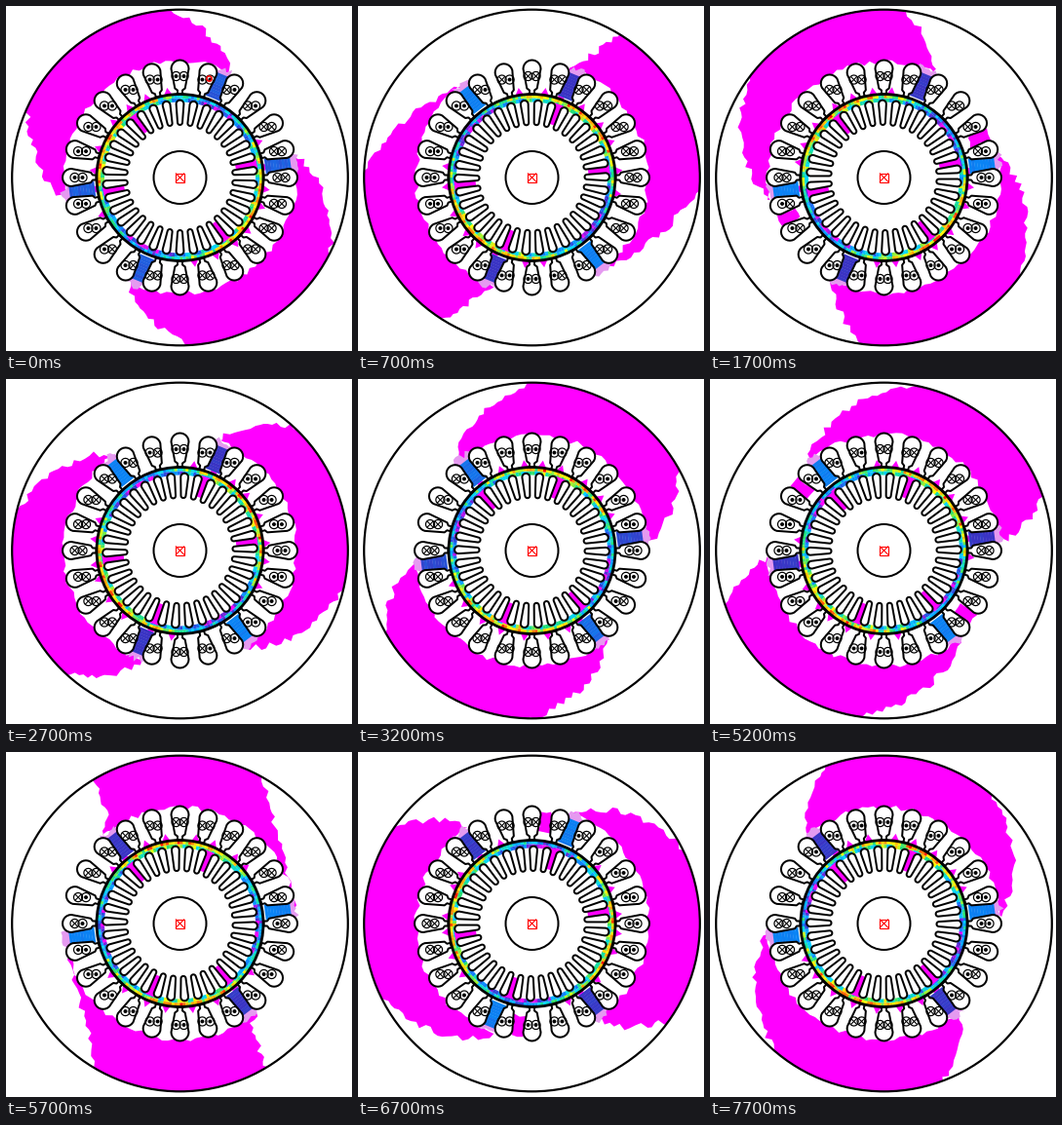
These frames come from a looping animation (355 by 354 pixels, 8000 ms). A matplotlib script:

```python
import random

import numpy as np
import matplotlib.pyplot as plt
from matplotlib.animation import FuncAnimation
from matplotlib.collections import LineCollection, PolyCollection
from matplotlib.colors import LinearSegmentedColormap, to_rgb
from matplotlib.patches import Circle, Rectangle

W, H, DPI = 355, 354, 100
PX = 72 / DPI
CX, CY = 178.5, 176
R_OUT, R_BORE, R_SHAFT, R_YOKE = 172.3, 85.5, 27, 119
SLOTS, BARS = 24, 34
PITCH = 360 / BARS
STATES = 17
STEP = 40          # rotor and current advance per state, degrees
DRIFT = 42.3       # advance of the saturated yoke, slightly faster
RIM_HALF = 30      # half the angle the saturation covers at the rim

MAGENTA, LAVENDER = to_rgb("#ff00ff"), to_rgb("#e59af0")
BRIGHT, INDIGO = np.array(to_rgb("#0a84f5")), np.array(to_rgb("#3a34c4"))
HEAT = LinearSegmentedColormap.from_list(
    "heat", ["#ff00ff", "#3a34d0", "#0a84ff", "#00d8ff",
             "#20e070", "#ffff00", "#ff9000", "#ff0000"])


def polar(deg, r):
    a = np.radians(deg)
    return CX + r * np.cos(a), CY - r * np.sin(a)


def place(pts, deg):
    """Map (radial, tangential) points onto the ray at deg."""
    a = np.radians(deg)
    return [(CX + u * np.cos(a) + v * np.sin(a),
             CY - u * np.sin(a) + v * np.cos(a)) for u, v in pts]


def cap(u, r, start, end):
    return [(u + r * np.cos(a), r * np.sin(a))
            for a in np.radians(np.linspace(start, end, 13))]


def strip(deg, r0, r1, half):
    return place([(r0, -half), (r1, -half), (r1, half), (r0, half)], deg)


SLOT = ([(86, -2.5), (89.5, -2.5), (91.5, -5.2)] + cap(111.5, 9, -90, 90)
        + [(91.5, 5.2), (89.5, 2.5), (86, 2.5)])
BAR = cap(75.5, 3.9, -90, 90) + cap(56.5, 2.5, 90, 270)


def jagged(pts, rng, size, gap):
    """Break a polyline into irregular saw teeth."""
    out = []
    for (x0, y0), (x1, y1) in zip(pts, pts[1:]):
        length = np.hypot(x1 - x0, y1 - y0) + 1e-6
        n = max(1, round(length / gap))
        nx, ny = (y0 - y1) / length, (x1 - x0) / length
        for i in range(n):
            t = i / n
            d = size * rng.uniform(-1.2, 1.2)
            out.append((x0 + t * (x1 - x0) + d * nx, y0 + t * (y1 - y0) + d * ny))
    return out + [pts[-1]]


def saturation(k):
    """Rim centre, inner lead and trail angles, and progress of the lead.

    At the slots the edges cling to the teeth between phase belts and jump
    by 60 degrees; at the rim they move on evenly.
    """
    centre = 123.5 + DRIFT * k
    reach = centre + 37
    trail = 60 * np.ceil((reach - 11) / 60) + 11
    return centre, trail - 127, trail, trail - reach


def yoke(k, half, rng):
    centre, lead, trail, wait = saturation(k)
    bend = np.clip(wait / 9, 0.3, 1.2)
    t = np.linspace(0, 1, 8)

    def edge(inner, rim):
        return [polar(half + inner + (rim - inner) * s ** bend,
                      R_YOKE + (R_OUT + 1 - R_YOKE) * s) for s in t]

    lo, hi = centre - RIM_HALF, centre + RIM_HALF
    rim = [polar(half + a, R_OUT + 2) for a in np.linspace(lo, hi, 30)]
    inner = [polar(half + a, R_YOKE) for a in np.linspace(trail, lead, 24)]
    return (jagged(edge(lead, lo), rng, 3, 5) + rim
            + jagged(edge(trail, hi)[::-1], rng, 3, 5)
            + jagged(inner, rng, 2.4, 5))


def tooth(deg, mix, rng):
    """Lavender tip plus a stack of blue slices; mix runs bright to indigo."""
    tip = place([(104, -9), (119, -10), (121, 0), (119, 10), (104, 9)], deg)
    polys, cols = [jagged(tip, rng, 3, 4)], [LAVENDER]
    for i in range(9):
        m = np.clip(mix + rng.uniform(-0.12, 0.12), 0, 1)
        r = 88 + 2.9 * i
        polys.append(strip(deg, r, r + 3.2, 8))
        cols.append(tuple(BRIGHT * (1 - m) + INDIGO * m))
    return polys, cols


def air_gap(hot, rng):
    polys, cols = [], []
    for deg in range(0, 360, 2):
        flux = abs(np.cos(np.radians(deg - hot)))
        ripple = 0.1 * np.cos(np.radians((deg - hot) * BARS))
        for r0, r1, drop in ((77.5, 81.5, 0.2), (81.5, 85.5, 0)):
            v = 0.24 + 0.56 * flux - drop + ripple + rng.uniform(-0.13, 0.13)
            polys.append([polar(deg, r0), polar(deg + 2.2, r0),
                          polar(deg + 2.2, r1), polar(deg, r1)])
            cols.append(HEAT(np.clip(v, 0, 1))[:3])
    return polys, cols


def stator_field(k, rng):
    _, lead, trail, wait = saturation(k)
    hot = 150 + STEP * k
    indigo = np.clip((wait - 20) / 20, 0, 1)
    polys = [yoke(k, half, rng) for half in (0, 180)]
    for half in (0, 180):
        if wait > 36:  # the next tooth starts to saturate
            block = strip(trail + 11.5 + half, 95, 116, 6)
            polys.append(jagged(block + block[:1], rng, 1.5, 5))
    for i in range(SLOTS):
        deg = 7.5 + 15 * i
        if abs(np.cos(np.radians(deg - hot))) > 0.5:
            s = rng.uniform(-5, 5)
            polys.append(place([(86, s - 4), (93, s), (86, s + 4)], deg))
    cols = [MAGENTA] * len(polys)
    for half in (0, 180):
        for deg, mix in ((lead + 3.5, indigo), (trail - 3.5, 1 - indigo)):
            ps, cs = tooth(deg + half, mix, rng)
            polys += ps
            cols += cs
    return polys, cols


def rotor_field(k, rng):
    trail = saturation(k)[2]
    polys, cols = air_gap(150 + STEP * k, rng)
    first = 90 + STEP * k + PITCH / 2
    for deg in (trail, trail - 60, trail + 180, trail + 120):
        near = first + PITCH * round((deg - first) / PITCH)
        polys.append(strip(near, 58, 80, 4.8))
        cols.append(MAGENTA)
    return polys, cols


def cross(x, y, s):
    return [[(x - s, y - s), (x + s, y + s)], [(x - s, y + s), (x + s, y - s)]]


def symbols(k):
    """Ring centres, dot centres and cross strokes of both winding layers."""
    dots_at = 135 + STEP * k
    rings, dots, crosses = [], [], []
    for i in range(SLOTS):
        deg = 15 * i
        x, y = polar(deg, 104)
        for dx, shift in ((-4, 0), (4, 30)):
            belt = 37.5 + 60 * np.floor((deg + shift - 7.5) / 60) - shift
            rings.append((x + dx, y))
            if np.cos(np.radians(belt - dots_at)) > 0:
                dots.append((x + dx, y))
            else:
                crosses += cross(x + dx, y, 3.2)
    return rings, dots, crosses


def discs(points, r):
    t = np.linspace(0, 2 * np.pi, 17)[:-1]
    ring = np.column_stack([r * np.cos(t), r * np.sin(t)])
    return [ring + p for p in points]


fig = plt.figure(figsize=(W / DPI, H / DPI), dpi=DPI, facecolor="white")
ax = fig.add_axes([0, 0, 1, 1])
ax.set_xlim(0, W)
ax.set_ylim(H, 0)
ax.axis("off")


def circle(r, lw, z, x=CX, y=CY, color="black"):
    return ax.add_patch(Circle((x, y), r, fill=False, ec=color, lw=lw * PX,
                               zorder=z))


def shapes(z, polys=(), **kw):
    return ax.add_collection(PolyCollection(polys, zorder=z, **kw),
                             autolim=False)


def strokes(z, segments, color):
    return ax.add_collection(
        LineCollection(segments, colors=color, linewidths=1.1 * PX, zorder=z),
        autolim=False)


OUTLINE = dict(facecolors="white", edgecolors="black", linewidths=2 * PX)
rim = circle(R_OUT, 2.2, 9)
stator = shapes(1)
stator.set_clip_path(rim)
shapes(2, [place(SLOT, 360 / SLOTS * i) for i in range(SLOTS)], **OUTLINE)
rotor = shapes(3)
bars = shapes(4, **OUTLINE)
circle(R_BORE, 2.8, 5)
circle(R_SHAFT, 2, 5)
ax.add_patch(Rectangle((CX - 4.5, CY - 4.5), 9, 9, fill=False, ec="red",
                       lw=1.1 * PX, zorder=6))
strokes(6, cross(CX, CY, 4.5), "red")
rings = shapes(6, facecolors="none", edgecolors="black", linewidths=1.2 * PX)
dots = shapes(7, facecolors="black")
crosses = strokes(7, [], "black")
mark = circle(2.6, 1.6, 8, 208.5, 74.5, "red")


def build(k):
    rng = random.Random(100 + k)
    return stator_field(k, rng), rotor_field(k, rng), symbols(k)


CACHE = [build(k) for k in range(STATES)]


def update(i):
    k = (i + 3) // 5  # the first state is cut short to 200 ms
    fields, labels = CACHE[k][:2], CACHE[k][2]
    for artist, (polys, cols) in zip((stator, rotor), fields):
        artist.set_verts(polys)
        artist.set_facecolor(cols)
    bars.set_verts([place(BAR, 90 + STEP * k + PITCH * j) for j in range(BARS)])
    rings.set_verts(discs(labels[0], 4.6))
    dots.set_verts(discs(labels[1], 2))
    crosses.set_segments(labels[2])
    mark.set_visible(k % 9 == 0)
    return stator, rotor, bars, rings, dots, crosses, mark


anim = FuncAnimation(fig, update, frames=80, interval=100, repeat=True,
                     repeat_delay=0)
plt.show()
```
